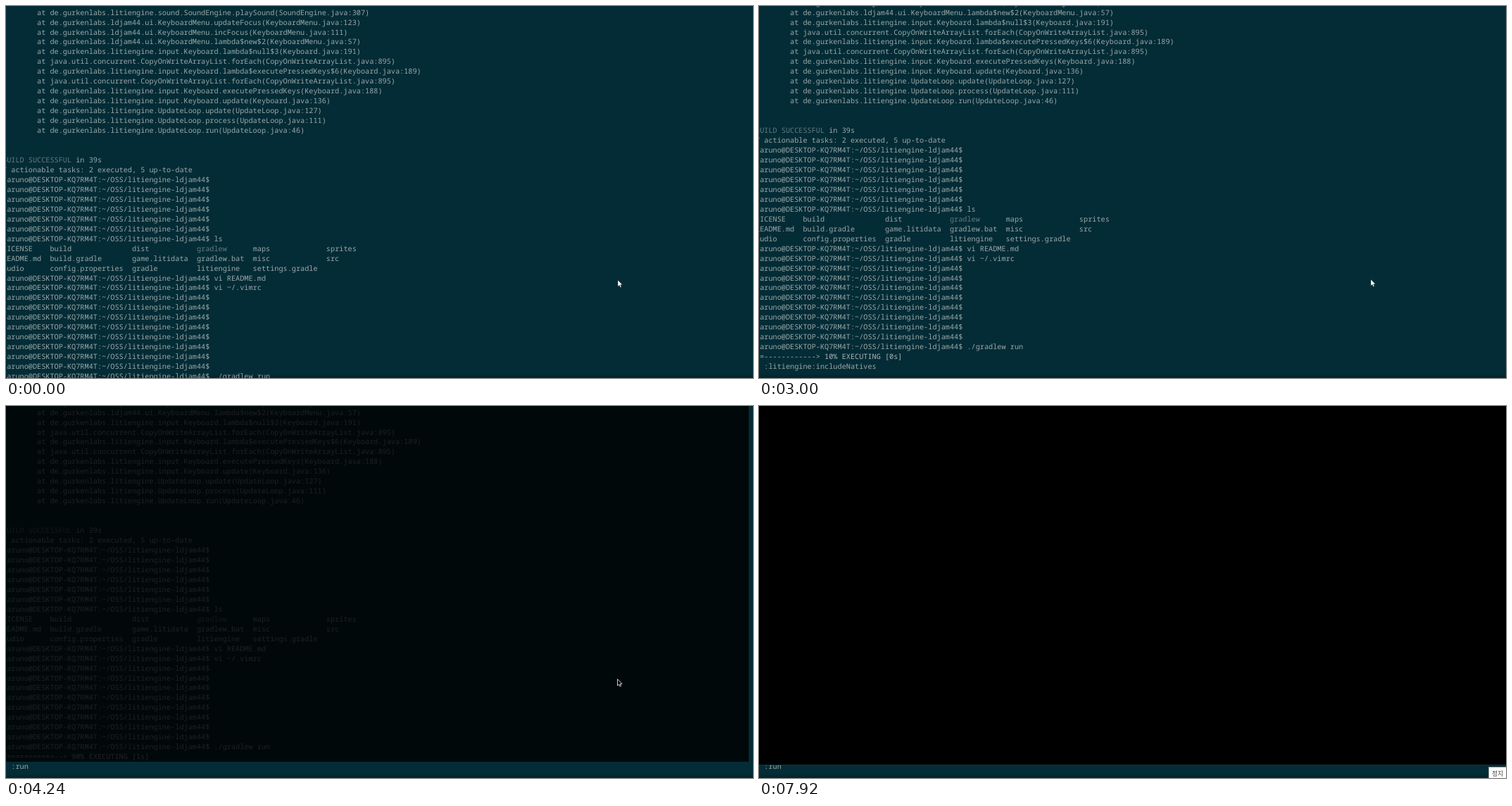
Animation, 1061 px wide and 528 px high, one loop 8000 ms. Source, as an HTML page:

```html
<!DOCTYPE html>
<html lang="en">
<head>
<meta charset="utf-8">
<title>Terminal run</title>
<style>
  html, body { margin: 0; width: 100%; height: 100%; overflow: hidden; background: #002b36; }
  svg { display: block; width: 100%; height: 100%; }
  .term text { font: 10.22px "Noto Sans Mono", "DejaVu Sans Mono", monospace; white-space: pre;
    fill: #9aa8a9; text-rendering: geometricPrecision; }
  .term .dim { fill: #647a81; }
  .term .bright { fill: #a9b5b5; }
  #tip text { font: 8.8px "Noto Sans CJK KR", "Noto Sans CJK", sans-serif; fill: #444; }
</style>
</head>
<body>
<svg viewBox="0 0 1061 528" preserveAspectRatio="none">
  <defs>
    <linearGradient id="edge" x2="0" y2="1">
      <stop offset="0" stop-color="#042c36"/>
      <stop offset="1" stop-color="#00242e"/>
    </linearGradient>
  </defs>
  <rect width="1061" height="528" fill="#042c36"/>
  <rect y="522" width="1061" height="6" fill="url(#edge)"/>
  <g id="screen" class="term"></g>
  <rect id="caret" x="375" y="518" width="1" height="10" fill="#93a1a1"/>
  <rect id="app" fill="#000"/>
  <rect id="rim" y="509" width="1061" height="1" fill="#0b3640"/>
  <path id="mouse" d="M0 0V9.2L2.1 7.3L3.5 10.4L5 9.7L3.7 6.7H6.5Z"/>
  <g id="tip">
    <rect x="1036.5" y="512.5" width="30" height="20" fill="#fff" stroke="#888"/>
    <text x="1041" y="524.5">정지</text>
  </g>
</svg>
<script>
const LOOP = 8000, ROW = 13.96, LEFT = -5, FIRST_BASELINE = 12.6;
const $ = id => document.getElementById(id);
const set = (el, attrs) => { for (const k in attrs) el.setAttribute(k, attrs[k]); };

const prompt = 'jaruno@DESKTOP-KQ7RM4T:~/OSS/litiengine-ldjam44$ ';
const engine = 'de.gurkenlabs.litiengine.', menu = 'de.gurkenlabs.ldjam44.ui.KeyboardMenu.';
const forEach = 'java.util.concurrent.CopyOnWriteArrayList.forEach(CopyOnWriteArrayList.java:895)';
const trace = [
  engine + 'sound.SoundEngine.playSound(SoundEngine.java:307)',
  menu + 'updateFocus(KeyboardMenu.java:123)',
  menu + 'incFocus(KeyboardMenu.java:111)',
  menu + 'lambda$new$2(KeyboardMenu.java:57)',
  engine + 'input.Keyboard.lambda$null$3(Keyboard.java:191)',
  forEach,
  engine + 'input.Keyboard.lambda$executePressedKeys$6(Keyboard.java:189)',
  forEach,
  engine + 'input.Keyboard.executePressedKeys(Keyboard.java:188)',
  engine + 'input.Keyboard.update(Keyboard.java:136)',
  engine + 'UpdateLoop.update(UpdateLoop.java:127)',
  engine + 'UpdateLoop.process(UpdateLoop.java:111)',
  engine + 'UpdateLoop.run(UpdateLoop.java:46)'
].map(s => '        at ' + s);

const STOPS = [0, 11, 30, 45, 58, 75];
const columns = names => names.split(' ').reduce((line, name, i) => line.padEnd(STOPS[i]) + name, '');
const blankPrompts = n => Array(n).fill(prompt);

// Outside prompts, a pair of tildes marks dim text.
const lines = [
  ...trace, '', '',
  '~BUILD SUCCESSFUL~ in 39s',
  '7 actionable tasks: 2 executed, 5 up-to-date',
  ...blankPrompts(6),
  prompt + 'ls',
  columns('LICENSE build dist gradlew maps sprites').replace('gradlew', '~gradlew~'),
  columns('README.md build.gradle game.litidata gradlew.bat misc src'),
  columns('audio config.properties gradle litiengine settings.gradle'),
  prompt + 'vi README.md',
  prompt + 'vi ~/.vimrc',
  ...blankPrompts(8),
  prompt + './gradlew run'
];

function addLine(row) {
  const el = document.createElementNS('http://www.w3.org/2000/svg', 'text');
  set(el, { x: LEFT, y: FIRST_BASELINE + row * ROW });
  $('screen').append(el);
  return el;
}
function addSpan(parent, text, cls) {
  const el = document.createElementNS('http://www.w3.org/2000/svg', 'tspan');
  el.textContent = text;
  if (cls) el.setAttribute('class', cls);
  parent.append(el);
  return el;
}

lines.forEach((line, row) => {
  const el = addLine(row);
  if (line.startsWith(prompt)) el.textContent = line;
  else line.split('~').forEach((part, i) => addSpan(el, part, i % 2 ? 'dim' : ''));
});
const status = addLine(lines.length), task = addLine(lines.length + 1);
const bar = addSpan(status, ''), state = addSpan(status, '', 'bright');

// start, percent, seconds, task
const progress = [
  [2380, 0, 0, 'IDLE'],
  [2620, 0, 0, ':litiengine:compileJava'],
  [3000, 10, 0, ':litiengine:includeNatives'],
  [3090, 70, 0, ':litiengine:jar'],
  [3180, 90, 0, ':run > Resolve dependencies of :runtimeClasspath'],
  [3320, 90, 1, ':run']
];
// start, left, right, bottom, opacity
const opening = [
  [4130, 10, 1035, 495, .18],
  [4240, 0, 1055, 505, .81],
  [4340, 0, 1060, 508, .98],
  [4440, 0, 1061, 509, 1]
];
// start, x, y
const pointer = [
  [0, 869, 389], [70, 870, 384], [180, 870, 380], [280, 869, 385], [390, 869, 388],
  [3940, 868.5, 387.7],
  [6540, 886.5, 392], [6630, 920, 408], [6700, 962, 438], [6770, 1000, 468],
  [6840, 1030, 496], [6910, 1050, 517], [6980, 1080, 540]
];
const at = (steps, t) => steps.findLast(s => s[0] <= t);
const show = (el, on) => set(el, { visibility: on ? 'visible' : 'hidden' });

function draw(t) {
  const scroll = t < 970 ? 0 : t < 2380 ? 1 : 3;
  set($('screen'), { transform: `translate(0 ${-scroll * ROW})` });
  show($('caret'), t >= 130 && t < 660);

  const step = at(progress, t);
  show(status, step);
  show(task, step);
  if (step) {
    const [, percent, seconds, name] = step;
    bar.textContent = '<' + '='.repeat(13 * percent / 100).padEnd(13, '-') + '> ';
    state.textContent = `${percent}% EXECUTING [${seconds}s]`;
    task.textContent = '> ' + name;
  }

  const win = at(opening, t);
  show($('app'), win);
  show($('rim'), t >= 4440);
  if (win) {
    const [, left, right, bottom, opacity] = win;
    set($('app'), { x: left, y: 0, width: right - left, height: bottom, opacity });
  }

  const [, x, y] = at(pointer, t), hollow = t >= 3940;
  set($('mouse'), {
    transform: `translate(${x} ${y})`,
    fill: hollow ? '#000' : '#fff',
    stroke: hollow ? '#fff' : '#001c24',
    'stroke-width': hollow ? .8 : .4
  });

  show($('tip'), t >= 7860);
  set($('tip'), { opacity: t < 7920 ? .5 : 1 });
}

const began = performance.now();
function tick() {
  draw((performance.now() - began) % LOOP);
  requestAnimationFrame(tick);
}
tick();
</script>
</body>
</html>
```
